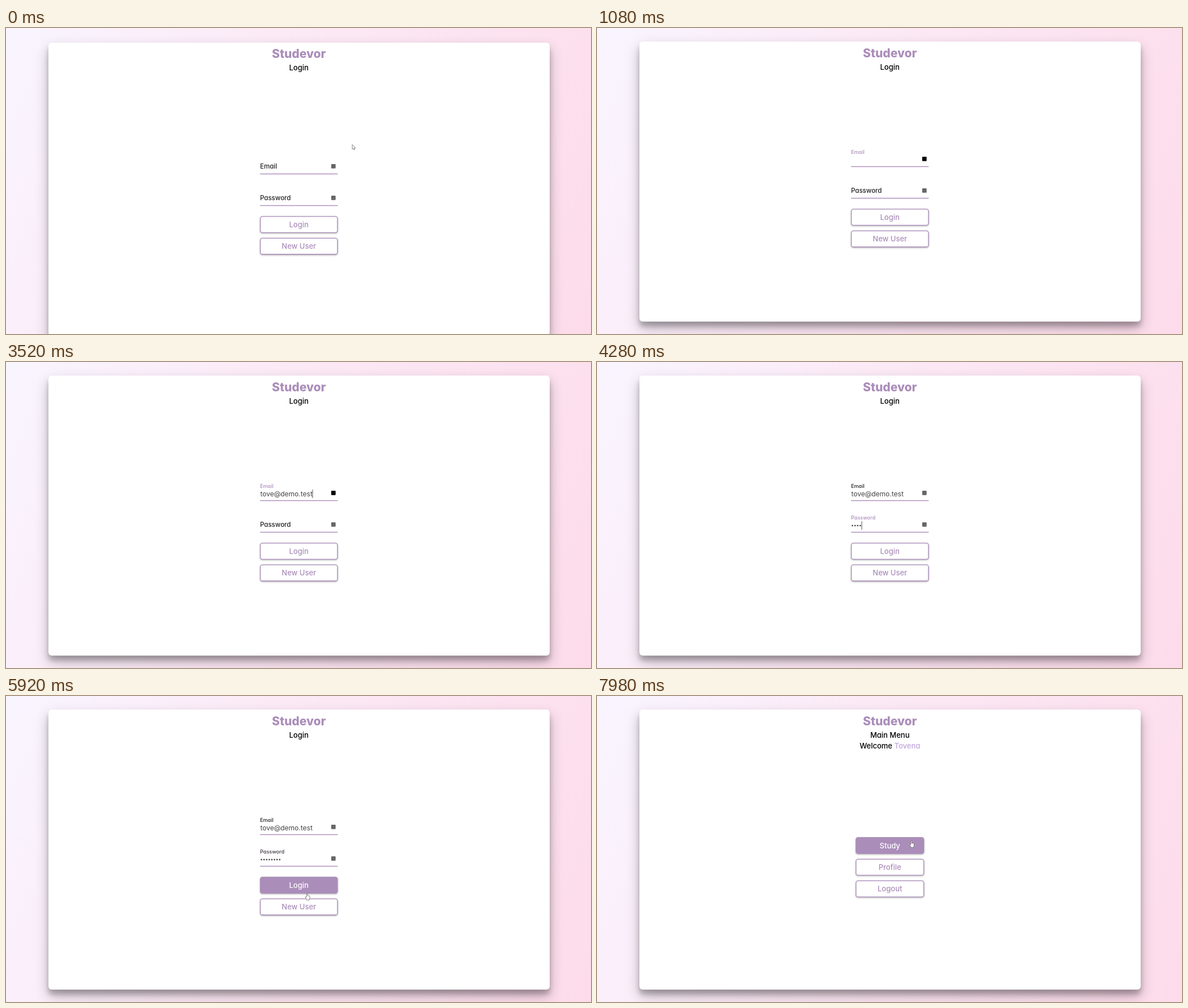
Recreate the animation shown at these times as an HTML page. Size 1034 by 542 pixels, loop 8000 ms.

```html
<!DOCTYPE html>
<html lang="en">
<head>
<meta charset="utf-8">
<title>Login</title>
<style>
  html, body { margin: 0; width: 100%; height: 100%; overflow: hidden; }
  body {
    position: relative;
    background: linear-gradient(115deg, #f9f5ff, #fce8f5 45%, #fddbea);
  }
  #card {
    position: absolute; left: 75px; width: 885.5px;
    border-radius: 6px; background: #fff;
    box-shadow: 0 11.6px 23.2px rgba(0, 0, 0, .25), 0 8.3px 8.3px rgba(0, 0, 0, .22);
  }
  svg { position: absolute; left: 0; top: 0; }
  text { font: 500 13px Inter, sans-serif; font-feature-settings: "cv11"; }
  .mid { text-anchor: middle; }
  .title { font-size: 21px; font-weight: 800; font-feature-settings: normal; }
  .entry { font-size: 12px; font-weight: 400; fill: #444; }
  .button { filter: drop-shadow(0 1.7px 1.5px rgba(0, 0, 0, .32)); }
</style>
</head>
<body>
<div id="card"></div>
<svg id="view" width="1034" height="542" viewBox="0 0 1034 542"></svg>
<script>
const LOOP = 8000, TICK = 97;
const CENTER = 517.7, LEFT = 449;
const PURPLE = [171, 141, 186], DARK = [34, 34, 34], WHITE = [255, 255, 255];
const ADDRESS = 'tove@demo.test';
const KEYS = [1370, 1480, 1660, 1770, 2260, 2550, 2650, 2740, 2840, 2940, 3230, 3330, 3420, 3520];
const DOTS = [3890, 4090, 4190, 4280, 4480, 4580, 4670, 4960];

// [time, shape, x, y], where x and y are the hot spot
const POINTER = [
  [0, 'arrow', 612, 206.5], [210, 'arrow', 605, 214], [300, 'arrow', 590, 226], [400, ''],
  [5350, 'hand', 532, 350], [5450, 'hand', 532, 349.4],
  [6710, 'hand', 535, 337], [6810, 'hand', 545, 292], [6910, 'hand', 558, 232],
  [7000, 'hand', 571, 174], [7100, 'hand', 580, 132], [7200, 'hand', 584, 112],
  [7490, 'arrow', 602, 98], [7590, 'arrow', 611, 93], [7690, 'arrow', 607, 142],
  [7780, 'arrow', 588, 206], [7880, 'hand', 564, 247], [7980, 'hand', 555.5, 256.5]
];
const SHAPES = {
  arrow: 'M0 0V8.2L1.9 6.5 3.2 9.3 4.5 8.7 3.3 6H5.8Z',
  hand: 'M-.8 7V1Q-.8 0 0 0T.9 1V4.2Q1.7 3.5 2.4 4.5 3.2 3.9 3.8 4.9 4.9 4.5 4.9 5.8V8.2Q4.8 9.7 4 10.5V12H-.6V10.8L-2.8 7.5Q-3.3 6.3-2.4 6.1-1.7 6-.8 7Z'
};

const card = document.getElementById('card');
const view = document.getElementById('view');
const ruler = document.createElement('canvas').getContext('2d');
let shown = '';

const clamp = v => Math.max(0, Math.min(1, v));
const rgb = c => `rgb(${c.map(Math.round)})`;
const mix = (a, b, p) => rgb(a.map((v, i) => v + (b[i] - v) * p));
const count = (times, t) => times.filter(at => t >= at).length;

function stepped(t, start, length) {
  if (t < start) return 0;
  const p = clamp(Math.floor((t - start) / TICK) * TICK / length);
  return p * p * (3 - 2 * p);
}

function text(str, x, y, fill, cls = 'mid', size = '') {
  const style = size && ` style="font-size:${size}px"`;
  return `<text class="${cls}" x="${x}" y="${y}" fill="${fill}"${style}>${str}</text>`;
}

function button(label, y, width, fill = 0) {
  const box = `x="${CENTER - width / 2 + .65}" y="${y + .65}" width="${width - 1.3}" height="28.4" rx="3.6"`;
  return `<rect class="button" ${box} fill="${mix(WHITE, PURPLE, fill)}" stroke="${rgb(PURPLE)}" stroke-width="1.3"/>`
    + text(label, CENTER, y + 19.5, mix(PURPLE, WHITE, fill));
}

function field(label, y, lift, focus, active) {
  return text(label, LEFT, y + 4.3 - 13 * lift, mix(DARK, PURPLE, focus), '', 11.5 - 2.4 * lift)
    + `<rect x="${LEFT}" y="${y + 12.8}" width="137.3" height="1.4" fill="${rgb(PURPLE)}"/>`
    + `<rect x="574.8" y="${y - 3.9}" width="7.8" height="7.6" rx="1" fill="${active ? '#000' : '#666'}"/>`;
}

const caret = (x, y) => `<rect x="${x}" y="${y - 6}" width="1" height="15" fill="#555"/>`;

function emailField(t, y) {
  const lift = t < 600 ? 0 : t < 690 ? .5 : 1;
  const leave = t < 3700 ? 0 : t < 3800 ? .35 : t < 3890 ? .8 : 1;
  const typed = ADDRESS.slice(0, count(KEYS, t));
  let out = field('Email', y, lift, lift * (1 - leave), t >= 400 && t < 3800)
    + text(typed, LEFT + .4, y + 6, '#444', 'entry');
  if (t >= 600 && t < 3700 && !(t >= 1080 && t < 1370)) {
    ruler.font = '400 12px Inter, sans-serif';
    out += caret(LEFT + ruler.measureText(typed).width, y);
  }
  return out;
}

function passwordField(t, y) {
  const lift = t < 3700 ? 0 : t < 3800 ? .35 : t < 3890 ? .8 : 1;
  const n = count(DOTS, t);
  let out = field('Password', y, lift, lift * (1 - stepped(t, 5640, 280)), false);
  for (let i = 0; i < n; i++)
    out += `<circle cx="${LEFT + 2.5 + i * 4.6}" cy="${y + 1.8}" r="1.4" fill="#444"/>`;
  if (t >= 3700 && t < 5730) out += caret(LEFT + n * 4.63, y);
  return out;
}

function loginPage(t, early) {
  const dy = early ? 13 : 0;
  return text('Login', CENTER, early ? 75.2 : 73.7, '#000')
    + emailField(t, 232 + dy)
    + passwordField(t, 288 + dy)
    + button('Login', 320.3 + dy, 137.5, stepped(t, 5350, 290))
    + button('New User', 358.7 + dy, 137.5);
}

function menuPage(t) {
  return text('Main Menu', CENTER, 73.7, '#000')
    + text('Welcome <tspan fill="#c1a3de">Tovena</tspan>', CENTER, 92.5, '#000')
    + button('Study', 250, 121, stepped(t, 7680, 290))
    + button('Profile', 288.4, 121)
    + button('Logout', 326.8, 121, 1 - stepped(t, 7395, 290));
}

function pointer(t) {
  const [, shape, x, y] = POINTER[count(POINTER.map(p => p[0]), t) - 1];
  return shape && `<path d="${SHAPES[shape]}" transform="translate(${x} ${y})"
    fill="#fff" stroke="#555" stroke-width=".7" stroke-linejoin="round"/>`;
}

function render(t) {
  const early = t < 120;
  const top = early ? 25.8 : 24.2;
  card.style.top = top + 'px';
  card.style.height = (early ? 545 : 520.3) - top + 'px';
  const scene = text('Studevor', CENTER, early ? 53.2 : 51.6, rgb(PURPLE), 'mid title')
    + (t < 6420 ? loginPage(t, early) : menuPage(t))
    + pointer(t);
  if (scene !== shown) view.innerHTML = shown = scene;
}

function frame() {
  render(performance.now() % LOOP);
  requestAnimationFrame(frame);
}
frame();
</script>
</body>
</html>
```
